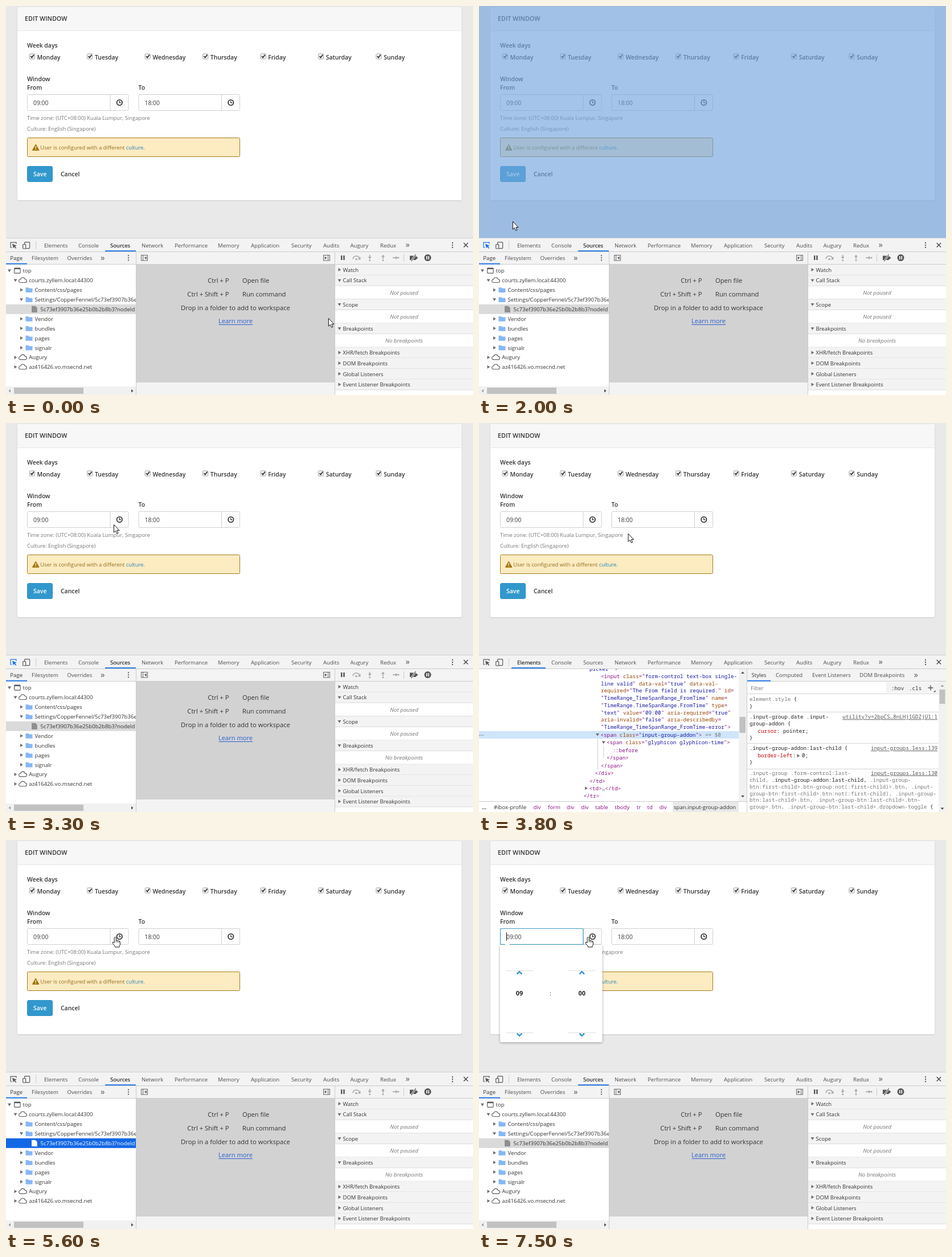
Recreate the animation shown at these times as an HTML page. Size 820x683 px, loop 8 s.

```html
<!DOCTYPE html>
<html lang="en">
<head>
<meta charset="utf-8">
<title>Edit window</title>
<style>
html, body { margin: 0; width: 100%; height: 100%; overflow: hidden; background: #e9e9e9; }
svg { display: block; }
#stage { width: 820px; height: 683px; }
text { font-family: "Open Sans", "Noto Sans", sans-serif; font-size: 9.6px; white-space: pre; }
.m { font-family: "Noto Sans Mono", "DejaVu Sans Mono", monospace; font-size: 9.27px; }
.s { font-weight: 600; font-size: 10.45px; }
.b { font-weight: 700; }
.i { font-style: italic; }
.e { text-anchor: end; }
.c { text-anchor: middle; }
.shadow { filter: drop-shadow(0 1px 2px rgba(0,0,0,.35)); }
</style>
</head>
<body>
<svg id="stage" viewBox="0 0 820 683"></svg>
<script>
const esc = s => s.replace(/&/g, '&amp;').replace(/</g, '&lt;');
const rect = (x, y, w, h, fill, more = '') =>
  `<rect x="${x}" y="${y}" width="${w}" height="${h}" fill="${fill}" ${more}/>`;
const text = (x, y, s, fill = '#333', cls = '', size) =>
  `<text x="${x}" y="${y}" fill="${fill}" class="${cls}"${size ? ` style="font-size:${size}px"` : ''}>${esc(s)}</text>`;
const fill = (d, color, more = '') => `<path d="${d}" fill="${color}" ${more}/>`;
const line = (d, color, w = 1, more = '') =>
  `<path d="${d}" fill="none" stroke="${color}" stroke-width="${w}" ${more}/>`;
const dot = (x, y, r, color, more = '') => `<circle cx="${x}" cy="${y}" r="${r}" fill="${color}" ${more}/>`;
const group = (id, body) => `<g id="${id}">${body}</g>`;
const clip = (x, y, w, h, body) =>
  `<svg x="${x}" y="${y}" width="${w}" height="${h}" viewBox="${x} ${y} ${w} ${h}" overflow="hidden">${body}</svg>`;
const dots = (x, y) => [-4, 0, 4].map(d => dot(x, y + d, 1.15, '#555')).join('');
const underline = (x, y, w) => rect(x, y - 1.8, w, 1.8, '#1a73e8');
const right = (x, y, c = '#6e6e6e') => fill(`M${x - 2} ${y - 3}l4.8 3l-4.8 3z`, c);
const down = (x, y, c = '#6e6e6e') => fill(`M${x - 3} ${y - 2}h6l-3 4.8z`, c);

// coloured runs: the first letter of each part picks the colour
const INK = { t: '#881280', n: '#994500', v: '#1a1aa6', g: '#777', k: '#222', r: '#c80000' };
const code = (x, y, s) => `<text x="${x}" y="${y}" class="m">` + s.split('|').map(p =>
  `<tspan fill="${INK[p[0]]}">${esc(p.slice(1))}</tspan>`).join('') + '</text>';

function clock(x, y) {
  return dot(x, y, 4.7, '#fff', 'stroke="#222" stroke-width="1.6"') + line(`M${x} ${y - 3}v3.3h2.6`, '#222', 1.2);
}

function timeField(x, value) {
  return rect(x + .5, 155.5, 177.5, 28, '#fff', 'rx="2" stroke="#d0d0d0"') +
    line(`M${x + 146} 155.5v28`, '#d0d0d0') +
    text(x + 11, 173.7, value, '#3a3a3a', '', 10.3) + clock(x + 162.3, 169.5);
}

function page() {
  let s = rect(0, 0, 820, 408, '#e9e9e9') +
    rect(20, 2, 780, 339, '#fff', 'rx="3" style="filter:drop-shadow(0 1px 1px rgba(0,0,0,.12))"') +
    fill('M20 43V5q0-3 3-3h774q3 0 3 3v38z', '#f7f7f7') + rect(20, 43, 780, 1, '#e7e7e7') +
    text(33, 26.3, 'EDIT WINDOW', '#333', 's', 10.75) + text(37, 72.7, 'Week days', '#333', 's');
  ['Monday', 'Tuesday', 'Wednesday', 'Thursday', 'Friday', 'Saturday', 'Sunday'].forEach((d, i) => {
    const x = 41 + 101.45 * i;
    s += rect(x + .2, 83.9, 9.2, 9.2, '#f4f4f4', 'rx="1.5" stroke="#a3a3a3"') +
      line(`M${x + 2.2} 88.2l2.1 2.3l3.8-5`, '#333', 1.8) + text(x + 13.5, 93.7, d, '#333', 's');
  });
  return s + text(37, 131.7, 'Window', '#333', 's') + text(37, 147, 'From', '#333', 's') +
    text(232.5, 147, 'To', '#333', 's') + timeField(37, '09:00') + timeField(232.5, '18:00') +
    text(37, 199.5, 'Time zone: (UTC+08:00) Kuala Lumpur, Singapore', '#777', '', 9.42) +
    text(37, 218.8, 'Culture: English (Singapore)', '#777', '', 9.42) +
    rect(37.5, 231.5, 373, 33, '#fdebc1', 'rx="2" stroke="#a57b14"') +
    fill('M52.2 243l5.8 10.3h-11.6z', '#a2760f', 'stroke="#a2760f" stroke-linejoin="round"') +
    rect(51.5, 246, 1.5, 3.6, '#fdebc1') + rect(51.5, 250.6, 1.5, 1.5, '#fdebc1') +
    `<text x="60.3" y="251.8" fill="#8f6d1f" style="font-size:9.38px">User is configured with a different <tspan fill="#2185bb">culture.</tspan></text>` +
    rect(37.5, 281.5, 44, 27, '#3198cd', 'rx="2.5" stroke="#2e90c4"') +
    text(48, 299, 'Save', '#fff', 's') + text(96, 299, 'Cancel', '#333', 's');
}

// inspector hint box
function hint(x, y, w, h, tag, name, size, rows) {
  const ax = x + 9;
  let s = '<g class="shadow">' + rect(x, y, w, h, '#fff', 'rx="2"') +
    fill(`M${ax} ${y + h}h12l-6 6z`, '#fff') + '</g>' +
    `<text x="${x + 7}" y="${y + 15}" style="font-size:10.7px"><tspan class="b" fill="#881280">${tag}</tspan>` +
    `<tspan class="b" fill="#1a1aa6">${name}</tspan></text>` +
    text(x + w - 7, y + 15, size, '#777', 'e', 10.4) + rect(x + 7, y + 20, w - 14, 1, '#ddd');
  rows.forEach(([k, v], i) => s += text(x + 7, y + 35 + i * 17.5, k, '#777', '', 10.6) +
    text(x + w - 7, y + 35 + i * 17.5, v, '#444', 'e', 10.6));
  return s;
}

const BLUE = 'rgba(115,165,223,.65)', ORANGE = 'rgba(246,178,107,.66)', GREEN = 'rgba(147,196,125,.55)';
function overlays() {
  return group('hlBody', rect(0, 0, 820, 408, BLUE)) +
    group('hlForm', rect(24.5, 114, 771, 151, BLUE) + rect(37, 265, 746, 12, ORANGE) +
      hint(24, 65, 150, 42, 'div', '.form-group', '912 × 178', [['Margin', '0px -15px 15px']])) +
    group('hlIcon', rect(194, 164, 11, 11.5, BLUE) +
      hint(183, 43, 257, 105, 'span', '.glyphicon.glyphicon-time', '14 × 14', [['Color', '#333333']])) +
    group('hlAddon', rect(183, 155, 33, 29, GREEN) + rect(194, 161, 11, 17, BLUE) +
      hint(183, 43, 187, 105, 'span', '.input-group-addon', '39 × 34', [['Color', '#333333'], ['Padding', '6px 12px']]));
}

function picker() {
  const chev = (x, y, d) => line(`M${x - 4.3} ${y + 2 * d}l4.3 ${-4.2 * d}l4.3 ${4.2 * d}`, '#2c95cc', 2.4);
  let s = '<g class="shadow">' + rect(37, 184, 179.5, 171, '#fff', 'rx="2.5"') + '</g>' +
    fill('M44.5 185l5.5-5l5.5 5z', '#fff');
  for (const x of [71, 180.7])
    s += rect(x - 24, 229, 48, 1, '#ddd') + rect(x - 24, 338, 48, 1, '#ddd') + chev(x, 233.3, 1) + chev(x, 341.7, -1);
  return s + text(71, 273.4, '09', '#222', 'b c', 10.8) + text(125.5, 272.8, ':', '#333', 'c', 10.5) +
    text(180.7, 273.4, '00', '#222', 'b c', 10.8);
}

function inspectIcon(color) {
  return rect(4, 411, 18, 18, '#f3f3f3') +
    line('M10.5 424H8V415.2h10v2.6', color, 1.2) + fill('M11 417.5l7.8 3.2l-3 1.3l2.6 2.9l-1.3 1.1l-2.6-2.9l-1.7 2.4z', color);
}

const TABS = { Elements: 67, Console: 127, Sources: 183, Network: 238, Performance: 296, Memory: 372,
  Application: 430, Security: 501, Audits: 557, Augury: 604.5, Redux: 657 };
const hoverTab = (id, name, w) =>
  group(id, rect(TABS[name] - 10, 408, w, 23, '#e4e4e4') + text(TABS[name], 423.5, name));

function toolbar() {
  let s = rect(0, 407.5, 820, 276, '#f3f3f3') + rect(0, 407, 820, 1, '#cfcfcf') + rect(0, 431, 820, 1, '#ccc') +
    group('iconOff', inspectIcon('#5a5a5a')) + group('iconOn', inspectIcon('#1a73e8')) +
    rect(32.6, 414.6, 9, 11, '#f3f3f3', 'rx="1" stroke="#5a5a5a" stroke-width="1.2"') +
    rect(29.6, 418.6, 5, 7.4, '#f3f3f3', 'rx="1" stroke="#5a5a5a" stroke-width="1.2"') + rect(52, 413, 1, 14, '#ccc');
  for (const k in TABS) s += text(TABS[k], 423.5, k, '#4d4d4d');
  return s + hoverTab('hover', 'Performance', 77) + hoverTab('hoverSrc', 'Sources', 54) +
    text(701.5, 424, '»', '#555', '', 15) + dots(784, 420) + line('M803.7 416l7.4 7.4m0-7.4l-7.4 7.4', '#444', 1.4);
}

function tree() {
  const cloud = y => line(`M26 ${y + 4}q-3.6-.2-3.4-3q.3-2.4 2.8-2.6q1-3.2 4-3.2q3.2 0 4 3q3 .3 3.1 3q-.1 2.6-2.8 2.8z`, '#5a5a5a', 1.1);
  const folder = y => fill(`M34.5 ${y - 4.2}h4.6l1.4 1.6h6v7.2h-12z`, '#86b7f5');
  const rows = [['top'], ['courts.zyllem.local:44300', 1, 1], ['Content/css/pages', 2], ['Settings/CopperFennel/5c73ef3907b36e25b0b2b8b3', 2, 1],
    ['5c73ef3907b36e25b0b2b8b3?nodeId', 3], ['Vendor', 2], ['bundles', 2], ['pages', 2], ['signalr', 2], ['Augury', 1], ['az416426.vo.msecnd.net', 1]];
  let s = rect(0, 454, 228, 229, '#fff');
  rows.forEach(([name, depth = 0, open], i) => {
    const y = 464.6 + 16.92 * i;
    if (depth == 3) {
      const row = (id, bg, ink, icon) => group(id, rect(0, y - 8.5, 228, 17, bg) +
        fill(`M45 ${y - 5.5}h6.5l3.3 3.3v8h-9.8z`, icon) + text(60.5, y + 3.6, name, ink));
      s += row('rowGray', '#dadada', '#333', '#8f8f8f') + row('rowBlue', '#1267e5', '#fff', '#fff');
      return;
    }
    const ax = [6, 16.5, 27][depth];
    s += (open || !depth ? down : right)(ax, y);
    s += depth == 1 ? cloud(y) : depth == 2 ? folder(y) :
      rect(14.6, y - 4.5, 10.5, 9, '#fff', 'rx="1" stroke="#555" stroke-width="1.1"') + rect(14.6, y - 4.5, 10.5, 2, '#555');
    s += text([29.5, 40.3, 50.5][depth], y + 3.6, name);
  });
  return clip(0, 454, 228, 229, s + rect(0, 668, 228, 15, '#f1f1f1') + rect(14, 670, 122, 11, '#c1c1c1') +
    fill('M8 672.7v6l-3.6-3z', '#a0a0a0') + fill('M220 672.7v6l3.6-3z', '#505050'));
}

function debugIcons() {
  const gray = '#a9a9a9';
  return rect(588, 438, 2.4, 8, '#555') + rect(592.3, 438, 2.4, 8, '#555') +
    line('M609 444q1.2-5 6-5q4 0 5.6 3.6', gray, 1.7) + fill('M622.5 440.2v5h-5z', gray) + dot(615, 444.5, 1.7, gray) +
    line('M638.7 437v5', gray, 1.7) + fill('M635.6 440.6h6.2l-3.1 3.6z', gray) + dot(638.7, 446.6, 1.5, gray) +
    line('M662 444v-5', gray, 1.7) + fill('M658.9 440.6h6.2l-3.1-3.8z', gray) + dot(662, 446.6, 1.5, gray) +
    line('M679 442h6', gray, 1.7) + fill('M684 439l4 3l-4 3z', gray) + dot(689, 442, 1.5, gray) + rect(698, 436, 1, 13, '#ccc') +
    fill('M709 438.4h10l4.5 3.8l-4.5 3.8h-10z', '#555') + line('M711.5 448.2l8-12', '#f3f3f3', 3) + line('M711.5 448.2l8-12', '#555', 1.2) +
    dot(740.5, 442, 6, '#555') + rect(737.9, 439, 1.8, 6, '#f3f3f3') + rect(741.3, 439, 1.8, 6, '#f3f3f3');
}

function sources() {
  let s = rect(0, 432, 820, 251, '#f3f3f3') + underline(174, 431, 54) + text(183, 423.5, 'Sources') +
    rect(0, 453, 820, 1, '#ccc') + underline(0, 453.5, 37) +
    text(7.3, 446, 'Page') + text(45, 446, 'Filesystem', '#4d4d4d') + text(107.5, 446, 'Overrides', '#4d4d4d') +
    text(166, 446.5, '»', '#555', '', 15) + dots(215, 442.3) + tree() +
    rect(229, 454, 348, 207, '#d2d2d2') + rect(228, 432, 1, 251, '#ccc') + rect(229, 661, 348, 22, '#f3f3f3');
  s += rect(237.5, 437.5, 11, 9.4, 'none', 'stroke="#666"') + line('M240.5 437.5v9.4', '#666') + fill('M246.8 439.5v5.4l-4-2.7z', '#666') +
    rect(557.5, 437.5, 11, 9.4, 'none', 'stroke="#666"') + line('M565.7 437.5v9.4', '#666') + fill('M559.6 439.5v5.4l4-2.7z', '#666');
  s += text(391.5, 486.3, 'Ctrl + P', '#333', 'e', 11.2) + text(415, 486.3, 'Open file', '#333', '', 11.2) +
    text(391.5, 510, 'Ctrl + Shift + P', '#333', 'e', 11.2) + text(415, 510, 'Run command', '#333', '', 11.2) +
    text(403, 533.8, 'Drop in a folder to add to workspace', '#333', 'c', 11.25) +
    text(403, 557.4, 'Learn more', '#2b5fd0', 'c', 11.15) + rect(373.5, 559, 59.5, 1, '#2b5fd0');
  s += rect(577, 454, 243, 229, '#fff') + debugIcons();
  [['Watch', 463], ['Call Stack', 481.7, 'Not paused'], ['Scope', 524, 'Not paused'], ['Breakpoints', 566.2, 'No breakpoints'],
    ['XHR/fetch Breakpoints', 608.4], ['DOM Breakpoints', 627.1], ['Global Listeners', 645.8], ['Event Listener Breakpoints', 664.5]]
    .forEach(([name, y, note]) => {
      s += rect(577, y - 9, 243, 18.4, '#f3f3f3') + rect(577, y + 9, 243, 1, '#dcdcdc') +
        (note ? down : right)(585.5, y) + text(591.5, y + 3.7, name, '#333', '', 9.5);
      if (note) s += text(699, y + 25, note, '#777', 'i c', 9.8) + rect(577, y + 32.4, 243, 1, '#dcdcdc');
    });
  return s + rect(577, 432, 1, 251, '#ccc');
}

function elements() {
  let s = rect(0, 432, 470, 232, '#fff') + rect(0, 541, 456, 13.2, '#cfe5fb') + line('M208.5 555v53M218.8 568v20', '#ccc') +
    text(0, 549, '…', '#555', '', 11);
  const rows = [
    [194, 435, 'vpicker "|t>'],
    [214, 447.8, 't<input |nclass|t="|vform-control text-box single-'],
    [214, 460.6, 'vline valid|t" |ndata-val|t="|vtrue|t" |ndata-val-'],
    [214, 473.3, 'nrequired|t="|vThe From field is required.|t" |nid|t='],
    [214, 486, 't"|vTimeRange_TimeSpanRange_FromTime|t" |nname|t='],
    [214, 498.8, 't"|vTimeRange.TimeSpanRange.FromTime|t" |ntype|t='],
    [214, 511.5, 't"|vtext|t" |nvalue|t="|v09:00|t" |naria-required|t="|vtrue|t"'],
    [214, 524.2, 'naria-invalid|t="|vfalse|t" |naria-describedby|t='],
    [214, 537, 't"|vTimeRange_TimeSpanRange_FromTime-error|t">'],
    [213.5, 550.7, 't<span |nclass|t="|vinput-group-addon|t">|g == $0'],
    [224, 564.2, 't<span |nclass|t="|vglyphicon glyphicon-time|t">'],
    [234.5, 577.6, 't::before'], [224, 591.1, 't</span>'], [214, 604.6, 't</span>'], [203.5, 618, 't</div>'],
    [194, 631.5, 't</td>'], [193.5, 645, 't<td>|k…|t</td>'], [183.5, 658.4, 't</tr>']];
  rows.forEach(r => s += code(...r));
  s += down(208, 547) + down(218.8, 560.5) + right(188, 641.3) +
    rect(456, 432, 14, 232, '#f1f1f1') + rect(457.5, 516, 10.5, 28, '#c1c1c1') +
    fill('M460 440h6l-3-3.6z', '#505050') + fill('M460 654h6l-3 3.6z', '#505050');
  s = clip(0, 432, 470, 232, s) + underline(57, 431, 60) + text(67, 423.5, 'Elements');

  let crumbs = rect(0, 664, 470, 19, '#fff') + rect(0, 664, 470, 1, '#ccc') + rect(340, 665, 116, 18, '#e9e9e9') +
    text(5, 677.7, '...', '#333', 'b') + text(26, 677.7, '#ibox-profile') + text(342, 677.7, 'span.input-group-addon');
  [['div', 95.5], ['form', 121], ['div', 154], ['div', 179.3], ['table', 204.3], ['tbody', 238.5], ['tr', 276.8], ['td', 295.5], ['div', 316.5]]
    .forEach(([n, x]) => crumbs += text(x, 677.7, n, '#881280'));
  return s + crumbs + styles();
}

function styles() {
  let s = rect(471, 432, 349, 251, '#fff') + rect(471, 432, 349, 22, '#f3f3f3') + rect(471, 453, 349, 1, '#ccc') +
    underline(471, 453.5, 41) + text(478.5, 446, 'Styles') + text(521, 446, 'Computed', '#4d4d4d') +
    text(585, 446, 'Event Listeners', '#4d4d4d') + text(668, 446, 'DOM Breakpoints', '#4d4d4d') + text(763.5, 446.5, '»', '#555', '', 15) +
    rect(715, 455, 92, 19, '#f3f3f3') + text(477, 468.7, 'Filter', '#777') +
    text(724, 468.5, ':hov', '#333', 'm') + text(755, 468.5, '.cls', '#333', 'm') +
    line('M788.5 465h9m-4.5-4.5v9', '#555', 1.4) + fill('M801.5 469v3.5h-3.5z', '#555');
  for (const y of [475, 507, 562, 607]) s += rect(471, y, 336, 1, '#d5d5d5');
  [[475, 488, 'gelement.style |k{'], [475, 500.5, 'k}'],
    [475, 519.3, 'k.input-group.date .input-'], [475, 531, 'kgroup-addon {'], [489.5, 544, 'rcursor|k: pointer;'], [475, 556, 'k}'],
    [475, 574.3, 'k.input-group-addon:last-child {'], [489.5, 587.4, 'rborder-left|k:'], [567, 587.4, 'k0;'], [475, 599.3, 'k}'],
    [475, 617.8, 'g.input-group .form-control:last-'],
    [475, 629.5, 'gchild, |k.input-group-addon:last-child,|g .input-group-'],
    [475, 641.5, 'gbtn:first-child>.btn-group:not(:first-child)>.btn, .input-'],
    [475, 653.5, 'ggroup-btn:first-child>.btn:not(:first-child), .input-group-'],
    [475, 665.2, 'gbtn:last-child>.btn, .input-group-btn:last-child>.btn-'],
    [475, 677, 'ggroup>.btn, .input-group-btn:last-child>.dropdown-toggle |k{']].forEach(r => s += code(...r));
  [['utility?v=2bpCS…8nLHj1GDZjU1:1', 519.3], ['input-groups.less:139', 574.3], ['input-groups.less:130', 617.8]].forEach(([n, y]) =>
    s += `<text x="805" y="${y}" class="m e" fill="#555" text-decoration="underline">${n}</text>`);
  return s + right(560.5, 584.2) + rect(807, 454, 13, 229, '#f1f1f1') + rect(808.5, 468, 10, 25, '#c1c1c1') +
    fill('M810.5 463h6l-3-3.6z', '#a0a0a0') + fill('M810.5 675.5h6l-3 3.6z', '#505050') + rect(470, 432, 1, 251, '#ccc');
}

const ARROW = 'M.4 .4V14.2L3.4 11.4L5.6 16.3L7.9 15.3L5.8 10.6H10z';
const HAND = 'M-1.6 1.5Q0-.8 1.6 1.5V6.2Q3.2 5.2 4.2 6.8Q5.8 6 6.6 7.5Q8.7 7.2 8.7 9.5V13Q8.4 15 7.2 16.4V18H-.4V16.4L-4.4 11.6Q-5.4 8.9-3 9.2L-1.6 10.6z';
const pointer = id => fill(id == 'hand' ? HAND : ARROW, '#fff', 'stroke="#111" stroke-width="1" stroke-linejoin="round"') +
  (id == 'hand' ? line('M1.6 6v3.6M4.2 7v3M6.7 7.8v2.6', '#111', .8) : '');

const stage = document.getElementById('stage');
stage.innerHTML = page() + overlays() +
  group('focus', rect(37.5, 155.5, 145.5, 28, 'none', 'rx="2" stroke="#3e9dcb" stroke-width="1.2"')) +
  group('picker', picker()) + group('caret', rect(48, 162, 1, 15, '#222')) +
  toolbar() + group('sources', sources()) + group('elements', elements()) +
  group('arrow', pointer('arrow')) + group('hand', pointer('hand'));

// pointer path: time, x, y
const PATH = [[0, 566, 548], [300, 470, 465], [600, 190, 291], [900, 30, 396], [1000, 15, 400], [1500, 8, 414], [1800, 8, 414],
  [2000, 59, 378], [2300, 252.3, 132], [2500, 225, 150], [2700, 194, 172], [2900, 194, 172], [3000, 189, 178], [3400, 189, 178],
  [3600, 196, 140], [3700, 225, 126], [4000, 335, 330], [4200, 322, 424], [4300, 282, 424], [4500, 215, 421], [4800, 200, 421],
  [5200, 193, 309], [5600, 191.7, 170], [8000, 191.7, 170]];

// visible spans: id, from, to, from, to ...
const SHOW = {
  hlBody: [1900, 2200], hlForm: [2200, 2700], hlIcon: [2700, 3000], hlAddon: [3000, 3300],
  iconOn: [1700, 3500], iconOff: [0, 1700, 3500, 8000],
  elements: [3500, 4700], sources: [0, 3500, 4700, 8000],
  hover: [4200, 4400], hoverSrc: [4500, 4700],
  rowBlue: [4700, 6300], rowGray: [0, 4700, 6300, 8000],
  focus: [6300, 8000], picker: [6400, 8000], caret: [6500, 7000, 7500, 8000],
  hand: [4100, 4900, 5600, 8000], arrow: [0, 4100, 4900, 5600]
};
const node = {};
for (const id in SHOW) node[id] = document.getElementById(id);

function place(t) {
  const i = PATH.findIndex(p => p[0] > t), [a, x, y] = PATH[i - 1], [b, u, v] = PATH[i];
  const k = (t - a) / (b - a);
  return `translate(${x + (u - x) * k} ${y + (v - y) * k})`;
}

function draw(now) {
  const t = Math.floor(now % 8000 / 100) * 100;
  for (const id in SHOW) {
    const on = SHOW[id].filter(edge => edge <= t).length % 2;
    node[id].style.display = on ? '' : 'none';
  }
  const at = place(t);
  node.arrow.setAttribute('transform', at);
  node.hand.setAttribute('transform', at);
}

let start;
function tick(now) {
  start ??= now;
  draw(now - start);
  requestAnimationFrame(tick);
}
draw(0);
requestAnimationFrame(tick);
</script>
</body>
</html>
```
